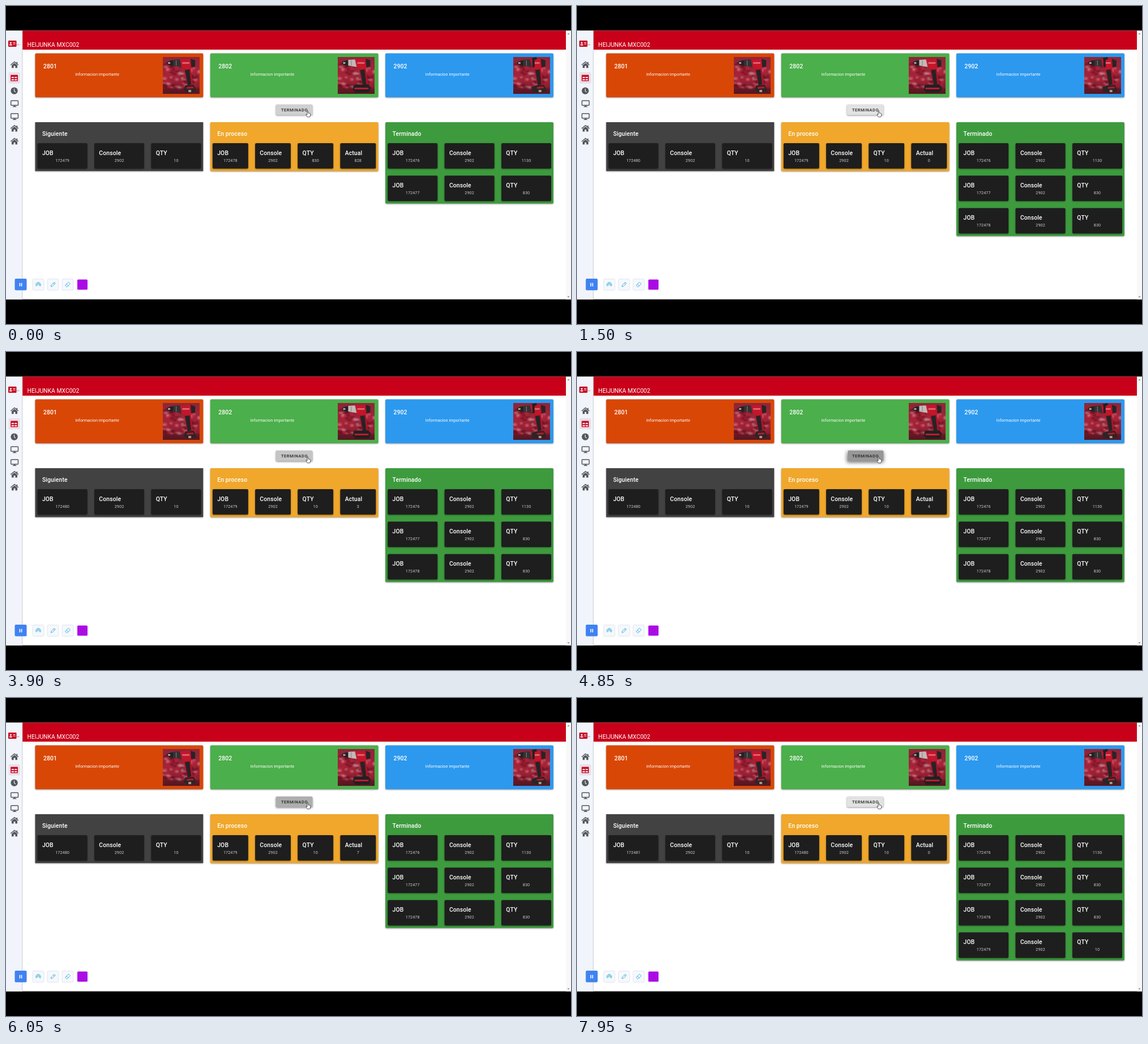
An HTML page with a canvas that plays this animation: 998x561 px, repeating every 8 s.

```html
<!DOCTYPE html>
<html lang="es">
<head>
<meta charset="utf-8">
<title>Heijunka</title>
<style>
html, body { margin: 0; width: 100%; height: 100%; overflow: hidden; background: #000; }
canvas { display: block; }
</style>
</head>
<body>
<canvas id="stage" width="998" height="561"></canvas>
<script>
const ctx = document.getElementById('stage').getContext('2d');
const LOOP = 8000;
// times at which the button is pressed
const PRESSES = [-397, 200, 950, 2400, 2960, 3530, 4120, 4700, 5200, 5716, 6230, 6750, 7270];
const REPLY = 180;

function box(g, x, y, w, h, fill, r = 0) {
  g.fillStyle = fill;
  g.beginPath();
  g.roundRect(x, y, w, h, r);
  g.fill();
}

function raised(x, y, w, h, fill, r = 2, lift = 0) {
  ctx.save();
  ctx.shadowColor = `rgba(0,0,0,${0.42 + lift * 0.13})`;
  ctx.shadowBlur = 2.5 + lift * 4;
  ctx.shadowOffsetY = 1 + lift * 1.3;
  box(ctx, x, y, w, h, fill, r);
  ctx.restore();
}

function poly(g, fill, pts) {
  g.fillStyle = fill;
  g.beginPath();
  for (let i = 0; i < pts.length; i += 2) g.lineTo(pts[i], pts[i + 1]);
  g.closePath();
  g.fill();
}

function disc(g, x, y, rx, ry, fill) {
  g.fillStyle = fill;
  g.beginPath();
  g.ellipse(x, y, rx, ry, 0, 0, 7);
  g.fill();
}

function text(str, x, y, size, { weight = 400, fill = '#fff', align = 'left', spacing = 0 } = {}) {
  ctx.font = `${weight} ${size}px Roboto, sans-serif`;
  ctx.letterSpacing = spacing * size + 'px';
  ctx.textAlign = align;
  ctx.fillStyle = fill;
  ctx.fillText(str, x, y);
}
const title = (str, x, y) => text(str, x, y, 10.4, { weight: 500, spacing: 0.0125 });

// cubic-bezier(.4, 0, .2, 1)
function ease(p) {
  if (p <= 0) return 0;
  if (p >= 1) return 1;
  let lo = 0, hi = 1, s;
  for (let i = 0; i < 14; i++) {
    s = (lo + hi) / 2;
    const x = 1.2 * s * (1 - s) ** 2 + 0.6 * s * s * (1 - s) + s ** 3;
    if (x < p) lo = s; else hi = s;
  }
  return 3 * s * s - 2 * s ** 3;
}

function random(seed) {
  return () => (seed = (seed * 16807) % 2147483647) / 2147483647;
}

function makePhoto(kind) {
  const c = document.createElement('canvas');
  c.width = c.height = 65;
  const g = c.getContext('2d');
  const rnd = random(71);
  const back = g.createLinearGradient(0, 0, 0, 65);
  back.addColorStop(0, '#8d2637');
  back.addColorStop(0.5, '#a52438');
  back.addColorStop(0.8, '#8c2031');
  back.addColorStop(1, '#5d1a25');
  g.fillStyle = back;
  g.fillRect(0, 0, 65, 65);
  g.filter = 'blur(1.2px)';
  const tones = ['rgba(215,155,165,.6)', 'rgba(95,14,30,.65)', 'rgba(190,35,60,.6)'];
  for (let i = 0; i < 85; i++) {
    const y = 10 + rnd() * 44;
    disc(g, rnd() * 65, y, 2 + rnd() * 3, 1.2 + rnd() * 1.8, tones[i % 3]);
  }
  box(g, 0, 55, 65, 10, 'rgba(75,20,30,.5)');
  g.filter = 'none';

  const pale = kind === 1;
  poly(g, '#b51428', [37, 18, 49, 17, 51, 33, 53, 50, 43, 53, 41, 36]);
  poly(g, '#252326', [39, 23, 47, 22, 50, 48, 44, 50]);
  poly(g, '#232124', [7, 9, 14, 6, 29, 5, 29, 16, 13, 15, 7, 12]);
  poly(g, pale ? '#c3b9b8' : '#353134', [18, 5, 34, 4, 35, 18, 18, 15]);
  poly(g, '#c3162b', [30, 4, 52, 3, 57, 8, 55, 18, 42, 22, 33, 18]);
  poly(g, '#272427', [49, 3, 57, 6, 57, 17, 50, 18]);
  box(g, 34, 9, 13, 3, '#df6070', 1);
  box(g, 9, 9, 4, 3, '#aaa0a0');
  box(g, 23, 6, 1, 9, pale ? '#898080' : '#8a8586');
  if (kind === 1) {
    poly(g, '#231f22', [28, 49, 54, 48, 58, 54, 55, 62, 31, 63, 26, 57]);
    box(g, 29, 54, 25, 3, '#bd1b2d', 1);
  } else {
    poly(g, '#2a2527', [39, 50, 55, 49, 59, 60, 43, 63, 37, 58]);
    poly(g, '#b41b2c', [42, 53, 53, 52, 55, 55, 42, 56]);
    box(g, 45, 58, 5, 4, '#a99b80', 1);
  }
  if (kind === 2) {
    box(g, 34, 3, 4, 15, '#1f2023', 1);
    poly(g, '#1f2023', [33, 2, 41, 0, 42, 4, 34, 6]);
    poly(g, '#2a2527', [32, 53, 41, 50, 42, 62, 34, 61]);
  }
  return c;
}
const photos = [0, 1, 2].map(makePhoto);

function home(y) {
  const c = '#54575c';
  ctx.strokeStyle = c;
  ctx.lineWidth = 1.5;
  ctx.beginPath();
  ctx.moveTo(8.2, y + 0.2);
  ctx.lineTo(15, y - 5.3);
  ctx.lineTo(21.8, y + 0.2);
  ctx.stroke();
  box(ctx, 18.4, y - 5, 1.8, 4, c);
  poly(ctx, c, [10, y + 0.8, 15, y - 3.2, 20, y + 0.8, 20, y + 5.5, 16.4, y + 5.5, 16.4, y + 2, 13.6, y + 2, 13.6, y + 5.5, 10, y + 5.5]);
}

function monitor(y) {
  ctx.strokeStyle = '#54575c';
  ctx.lineWidth = 1.5;
  ctx.beginPath();
  ctx.roundRect(8.7, y - 5, 12.8, 8.2, 1);
  ctx.stroke();
  box(ctx, 13.6, y + 3.5, 3, 2, '#54575c');
  box(ctx, 11.8, y + 5, 6.6, 1.2, '#54575c');
}

function sidebar() {
  box(ctx, 0, 43.5, 29, 474, '#f1f4fa');
  box(ctx, 28.3, 43.5, 1, 474, '#c9ccd1');
  box(ctx, 4, 61, 14.5, 11, '#c70a25', 1.2);
  disc(ctx, 8.3, 65, 1.6, 1.6, '#fff');
  box(ctx, 5.8, 67.6, 5, 2, '#fff', 1);
  box(ctx, 12.5, 64, 4, 1, '#fff');
  box(ctx, 12.5, 66.5, 4, 1, '#fff');
  box(ctx, 19, 67.8, 4.5, 0.8, '#b0707c');
  home(103.8);
  box(ctx, 4.7, 117, 20, 19.5, '#e7dfe6', 2);
  box(ctx, 8.2, 121.5, 12.8, 11, '#c70a25', 1.2);
  for (const x of [9.8, 15.2]) for (const y of [125, 129]) box(ctx, x, y, 4.2, 2.2, '#f1dfe5');
  disc(ctx, 14.6, 149.6, 6.2, 6.2, '#54575c');
  ctx.strokeStyle = '#f1f4fa';
  ctx.lineWidth = 1.1;
  ctx.beginPath();
  ctx.moveTo(14.5, 145.8);
  ctx.lineTo(14.5, 150);
  ctx.lineTo(17, 151.8);
  ctx.stroke();
  monitor(172);
  monitor(194.8);
  home(216);
  home(238.8);
}

function toolbar() {
  box(ctx, 15.5, 481, 21, 20.5, '#3f82f1', 2);
  box(ctx, 23.6, 488.6, 1.6, 6, '#fff');
  box(ctx, 26.8, 488.6, 1.6, 6, '#fff');
  for (const x of [47, 73, 99]) {
    box(ctx, x, 481.5, 20, 20, '#f5f8fc', 2);
    ctx.strokeStyle = '#dbe3ec';
    ctx.lineWidth = 0.8;
    ctx.stroke();
  }
  ctx.strokeStyle = '#35abd5';
  ctx.lineWidth = 0.9;
  for (const r of [1.3, 2.8, 4.3]) {
    ctx.beginPath();
    ctx.arc(57, 491.8, r, 2.5, 7);
    ctx.stroke();
  }
  const slanted = (x, draw) => {
    ctx.save();
    ctx.translate(x, 491.5);
    ctx.rotate(-Math.PI / 4);
    ctx.beginPath();
    draw();
    ctx.stroke();
    ctx.restore();
  };
  slanted(83, () => {
    ctx.moveTo(-5, 0);
    ctx.lineTo(-3, -1.4);
    ctx.lineTo(4.5, -1.4);
    ctx.lineTo(4.5, 1.4);
    ctx.lineTo(-3, 1.4);
    ctx.closePath();
    ctx.moveTo(2.6, -1.4);
    ctx.lineTo(2.6, 1.4);
  });
  slanted(109, () => {
    ctx.roundRect(-4.2, -2.2, 8.4, 4.4, 1);
    ctx.moveTo(-1, -2.2);
    ctx.lineTo(-1, 2.2);
  });
  box(ctx, 126, 482.5, 18, 18, '#aa0be4', 1.5);
}

function shell() {
  box(ctx, 0, 0, 998, 561, '#000');
  box(ctx, 0, 43.5, 998, 474, '#fff');
  box(ctx, 29, 43.5, 960, 33.5, '#c80019');
  box(ctx, 989, 43.5, 9, 474, '#f8f8f8');
  poly(ctx, '#8b8b8b', [991.5, 50, 993.5, 47.5, 995.5, 50]);
  poly(ctx, '#8b8b8b', [991.5, 512, 993.5, 514.5, 995.5, 512]);
  text('HEIJUNKA MXC002', 37.5, 72, 10.4);
  sidebar();
}

function topCards() {
  [['2801', '#d94706'], ['2802', '#4baf4b'], ['2902', '#2c99ef']].forEach(([name, fill], i) => {
    const x = 51.5 + i * 309.3;
    raised(x, 83.6, 296.8, 77.4, fill);
    title(name, x + 14.4, 110);
    text('Informacion importante', x + 109.6, 122.7, 7.28, { align: 'center', spacing: 0.0071 });
    ctx.drawImage(photos[i], x + 225.6, 90);
  });
}

function panel(x, name, fill, rows, heads, radius) {
  const four = heads.length > 3;
  const pitch = four ? 75.15 : 100.4;
  const w = four ? 62.9 : 88;
  raised(x, 205, 296.8, 86.3 + 57.2 * (rows.length - 1), fill, radius);
  title(name, x + 12.4, 229);
  rows.forEach((row, r) => row.forEach((value, c) => {
    const cx = x + 4.1 + c * pitch;
    const y = 242 + r * 57.2;
    raised(cx, y, w, 44.8, '#1e1e1e');
    title(heads[c], cx + 8.3, y + 20.5);
    text(value, cx + w / 2, y + 32.8, 7.28, { fill: 'rgba(255,255,255,.76)', align: 'center', spacing: 0.0071 });
  }));
}

function boardAt(t) {
  const jobs = [[172476, 1130], [172477, 830], [172478, 830]];
  for (let j = 172479; j < 172483; j++) jobs.push([j, 10]);
  let now = 2, made = 827;
  for (const p of PRESSES) {
    if (t >= p + REPLY && ++made >= jobs[now][1]) {
      now++;
      made = 0;
    }
  }
  const row = ([job, qty]) => [job, 2902, qty];
  return {
    next: [row(jobs[now + 1])],
    active: [[...row(jobs[now]), made]],
    done: jobs.slice(0, now).map(row)
  };
}

function button(t) {
  const age = t - PRESSES.filter(p => p <= t).pop();
  const lift = age < 150 ? age / 150 : Math.max(0, 1 - (age - 150) / 250);
  raised(476.6, 173.8, 64.8, 18.8, '#e2e2e2', 2, lift);
  const alpha = 0.335 * Math.min(1, age / 100) * (1 - ease((age - 250) / 300));
  if (alpha > 0) {
    ctx.save();
    ctx.beginPath();
    ctx.roundRect(476.6, 173.8, 64.8, 18.8, 2);
    ctx.clip();
    const r = 60 * (0.3 + 0.7 * ease(age / 250));
    disc(ctx, 532, 187, r, r, `rgba(0,0,0,${alpha})`);
    ctx.restore();
  }
  text('TERMINADO', 486, 185.5, 7.28, { weight: 500, fill: '#202020', spacing: 0.0893 });
}

const hand = new Path2D('M532.2 185.2q1-.9 1.6.3v3.2l3 .7q1.2.4 1.1 1.6l-.7 3.3-.6 1.5h-4.2l-2.4-3.7q-.3-1.2.9-1l1.1.8v-5.8z');
function cursor() {
  ctx.fillStyle = '#fff';
  ctx.strokeStyle = '#333';
  ctx.lineWidth = 0.8;
  ctx.fill(hand);
  ctx.stroke(hand);
}

function draw(t) {
  const board = boardAt(t);
  const heads = ['JOB', 'Console', 'QTY'];
  shell();
  topCards();
  panel(51.5, 'Siguiente', '#424242', board.next, heads, 0);
  panel(360.8, 'En proceso', '#f0a72b', board.active, [...heads, 'Actual'], 2);
  panel(670.1, 'Terminado', '#3d9b3e', board.done, heads, 2);
  button(t);
  toolbar();
  cursor();
}

let start;
function tick(now) {
  start ??= now;
  draw((now - start) % LOOP);
  requestAnimationFrame(tick);
}
requestAnimationFrame(tick);
</script>
</body>
</html>
```
